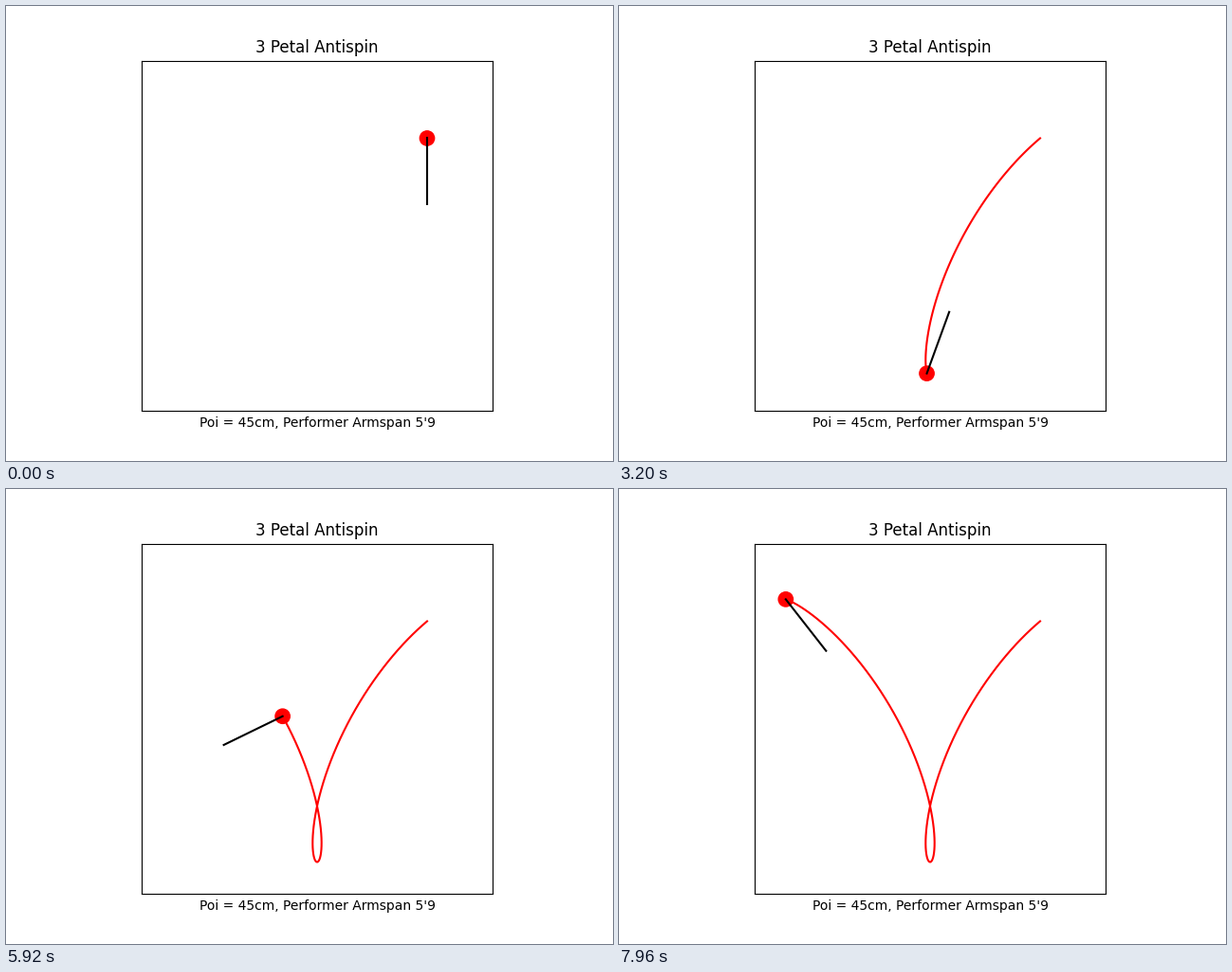
Write a matplotlib script that moves like this. It is 640x480 px and loops after 8 s.

```python
import numpy as np
import matplotlib.pyplot as plt
from matplotlib.animation import FuncAnimation
from matplotlib.patches import Circle

FRAMES, INTERVAL = 200, 40
ARM, POI = 75.65, 45      # cm
VIEW, DROP = 120.5, 22.1  # half width of the view, shoulder above its middle

# the hand turns clockwise, the poi twice as fast the other way
turn = np.radians(np.arange(FRAMES))
hand_x, hand_y = ARM * np.cos(turn), -ARM * np.sin(turn)
poi_x = hand_x + POI * np.cos(np.pi / 2 + 2 * turn)
poi_y = hand_y + POI * np.sin(np.pi / 2 + 2 * turn)

fig, ax = plt.subplots(figsize=(6.4, 4.8), dpi=100)
ax.set_aspect("equal")
ax.set_xlim(-VIEW, VIEW)
ax.set_ylim(-VIEW - DROP, VIEW - DROP)
ax.set_xticks([])
ax.set_yticks([])
ax.set_title("3 Petal Antispin")
ax.set_xlabel("Poi = 45cm, Performer Armspan 5'9")

trace, = ax.plot([], [], color="red", lw=1.5)
tether, = ax.plot([], [], color="black", lw=1.5)
head = ax.add_patch(Circle((poi_x[0], poi_y[0]), 5, color="red"))


def update(i):
    trace.set_data(poi_x[:i + 1], poi_y[:i + 1])
    tether.set_data([hand_x[i], poi_x[i]], [hand_y[i], poi_y[i]])
    head.center = poi_x[i], poi_y[i]
    return trace, tether, head


anim = FuncAnimation(fig, update, frames=FRAMES, interval=INTERVAL,
                     repeat=True, repeat_delay=0)
plt.show()
```
